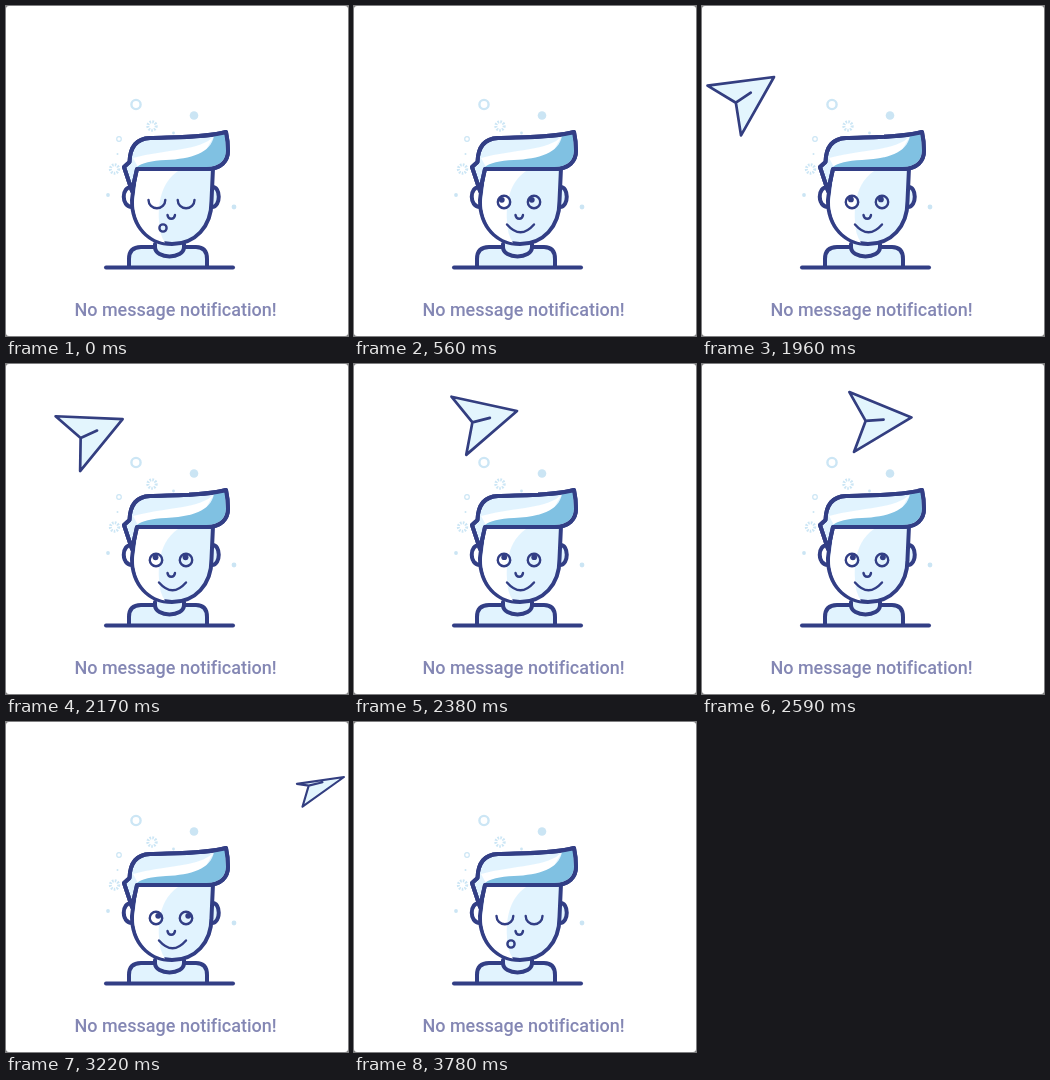
An HTML page that plays this animation: 342x330 px, repeating every 4.55 s.

```html
<!DOCTYPE html>
<html lang="en">
<head>
<meta charset="utf-8">
<title>No message notification</title>
<style>
  html, body { margin: 0; width: 100%; height: 100%; overflow: hidden; background: #777; }
  svg { display: block; width: 342px; height: 330px; background: #fff; border-radius: 3px; }
  .line { stroke: #323e85; stroke-width: 4; stroke-linecap: round; stroke-linejoin: round; }
  .thin { fill: none; stroke: #323e85; stroke-width: 2.4; stroke-linecap: round; }
  .plane { fill: #e3f5fd; stroke: #333e80; stroke-width: 2.7; stroke-linejoin: round; stroke-linecap: round; }
  text { font: 500 18px Roboto, sans-serif; font-variant-ligatures: none; fill: #8487b4; text-anchor: middle; }
</style>
</head>
<body>
<svg viewBox="0 0 342 330">
  <defs>
    <path id="hair" d="M220 126C200 132 165 131 144 132C131 132.500 124 140 123.500 156L118 161L126 185L131 163H201C215 163 222 155 222 145Q222 135 220 126Z"/>
  </defs>
  <g fill="#cbe5f4">
    <circle cx="188" cy="109.500" r="4.3"/>
    <circle cx="228" cy="201" r="2.4"/>
    <circle cx="102" cy="189" r="1.9"/>
    <circle cx="167.500" cy="127" r="1.4"/>
    <circle cx="111.500" cy="148" r="1"/>
  </g>
  <g fill="none" stroke="#cce6f5">
    <circle cx="130" cy="98.500" r="4.6" stroke-width="2.4"/>
    <circle cx="113" cy="133" r="2.3" stroke-width="1.2"/>
    <g stroke-width="3" stroke-dasharray="1.6 1.2">
      <circle cx="146" cy="120" r="4.2"/>
      <circle cx="108.500" cy="163" r="4.2"/>
    </g>
  </g>

  <g class="line" fill="#e1f3fe">
    <path d="M123 261V253Q123 241 135 241H190Q201 241 201 253V261"/>
    <path d="M149 238V241C149 253.500 178 253.500 178 241V238"/>
    <path d="M100 261.500H227"/>
    <path d="M126 181C115 180 115 201 126 201" fill="#fff"/>
    <path d="M206 181C215 180 215 201 206 201"/>
    <path d="M130 162L126 194C126 221 143 238 166 238C189 238 205.500 221 205.500 195L207 162Z"/>
    <path d="M132 165H172C156 176 152 195 153 215Q153 228 159 236.500C140 233 128 216 128 196Z" fill="#fff" stroke="none"/>
    <use href="#hair"/>
    <g stroke="none">
      <path d="M208 130C195 145 160 143 127 152L132 161H190Z" fill="#fff"/>
      <path d="M219 128L208 130C205 147 185 153 160 154Q138 155 131 161H201C213 161 220 154 220 145Z" fill="#80c1e2"/>
    </g>
    <use href="#hair" fill="none"/>
  </g>

  <path class="thin" d="M161.500 209A3.8 4.500 0 0 0 169 209"/>
  <g class="thin" id="asleep">
    <path d="M142.500 194A8.400 8.200 0 0 0 159.300 194M171.700 194A8.400 8.200 0 0 0 188.500 194"/>
    <circle cx="157" cy="222" r="3.600"/>
  </g>
  <g id="awake">
    <g class="thin">
      <circle cx="150" cy="196" r="6.200"/>
      <circle cx="180" cy="196" r="6.200"/>
      <path d="M153 218.500Q166.500 234 180 218.500"/>
    </g>
    <g id="pupils" fill="#323e85">
      <circle cx="150" cy="193.800" r="2.900"/>
      <circle cx="180" cy="193.800" r="2.900"/>
    </g>
  </g>

  <path class="plane" id="plane"/>
  <text x="169.500" y="310">No message notification!</text>
</svg>
<script>
const LOOP = 4550, STEP = 70;
const WAKE = 560, ENTER = 1610, BANK = 2590, EXIT = 3500, SLEEP = 3780;
const el = id => document.getElementById(id);
const show = (id, on) => el(id).style.display = on ? "" : "none";

// Points the plane's tip passes, one every LEG ms from LEG_START
const LEG_START = 1540, LEG = 420;
const route = [[-6, 118], [72, 71], [163, 47], [255, 62], [338, 55], [420, -45]];

function tipAt(t) {
  const s = (t - LEG_START) / LEG, i = Math.floor(s), u = s - i;
  const point = k => route[Math.min(Math.max(k, 0), route.length - 1)];
  return [0, 1].map(axis => {
    const [a, b, c, d] = [-1, 0, 1, 2].map(k => point(i + k)[axis]);
    return b + u / 2 * (c - a + u * (2 * a - 5 * b + 4 * c - d + u * (3 * (b - c) + d - a)));
  });
}

// The plane turns steadily, then banks: it narrows, shrinks and turns back
function drawPlane(t) {
  const bank = Math.max(0, (t - BANK) / 630) ** 1.3, bank2 = bank * bank;
  const heading = -34 + 0.047 * (t - 1960) - 39 * bank2;
  const upper = 30 * (1 - 0.81 * bank), lower = 30 * (1 - 0.2 * bank);
  const plane = el("plane");
  plane.setAttribute("d", `M0 0L-60 ${-upper}L-46 0L-60 ${lower}ZM-46 0H-28`);
  plane.setAttribute("transform", `translate(${tipAt(t)}) rotate(${heading}) scale(${1 - 0.21 * bank2})`);
}

function draw(now) {
  const t = Math.floor(now % LOOP / STEP) * STEP;
  const awake = t >= WAKE && t < SLEEP, flying = t >= ENTER && t < EXIT;
  show("awake", awake);
  show("asleep", !awake);
  show("plane", flying);
  if (flying) drawPlane(t);

  const glance = Math.min(1, Math.max(0, (t - ENTER) / 1400));
  const lift = Math.sin(Math.PI * glance);
  el("pupils").setAttribute("transform", `translate(${4.4 * glance - 2.2} ${-0.6 * lift})`);
}

const start = performance.now();
function tick() {
  draw(performance.now() - start);
  requestAnimationFrame(tick);
}
tick();
</script>
</body>
</html>
```
